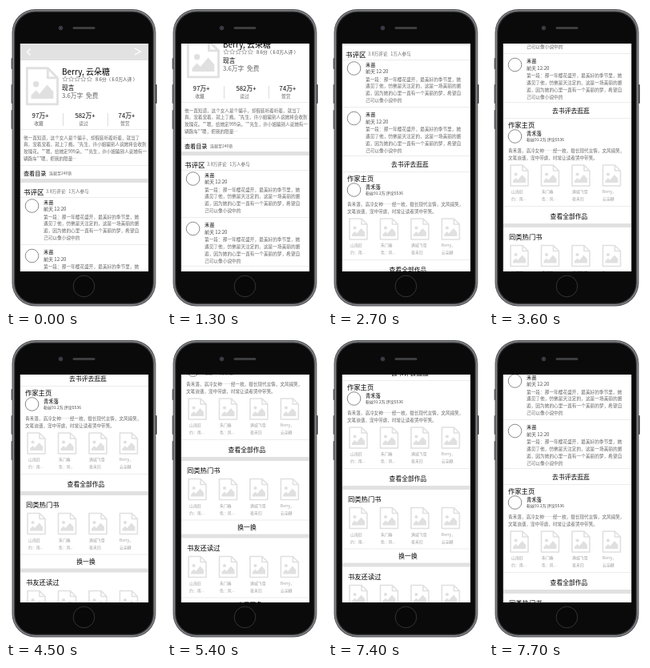
Recreate the animation shown at these times as an HTML page. Size 194 px wide and 379 px high, loop 8 s.

```html
<!DOCTYPE html>
<html lang="zh-CN">
<head>
<meta charset="utf-8">
<style>
  html, body { margin: 0; width: 100%; height: 100%; overflow: hidden; background: #fff; }
  svg { display: block; width: 194px; height: 379px; }
  text { font-family: "Noto Sans CJK SC", "Noto Sans CJK", "Noto Sans", sans-serif; white-space: pre; }
</style>
</head>
<body>
<svg viewBox="0 0 194 379">
  <defs>
    <clipPath id="screen"><rect x="18" y="47" width="160" height="285"/></clipPath>
    <g id="file">
      <path d="M1 1H16L23 8V27H1Z M16 1V8H23" fill="none" stroke="#e0e0e0" stroke-width="1.6" stroke-linejoin="round"/>
      <circle cx="7.5" cy="12.5" r="2.1" fill="#e0e0e0"/>
      <path d="M4 23V20.5L7.500 17L10 19.5L15.5 13L20 18V23Z" fill="#e0e0e0"/>
    </g>
  </defs>

  <g fill="#5a5b5d">
    <rect x="6.500" y="65" width="3" height="14" rx="1"/>
    <rect x="6.500" y="98" width="3" height="24" rx="1"/>
    <rect x="6.500" y="130" width="3" height="24" rx="1"/>
    <rect x="186" y="98" width="3" height="24" rx="1"/>
  </g>
  <rect x="7.5" y="4" width="180" height="371.5" rx="29" fill="#4c4d50"/>
  <rect x="8.5" y="5" width="178" height="369.5" rx="28" fill="#85868a"/>
  <rect x="10" y="6.500" width="175" height="366.5" rx="26.5" fill="#3a3b3d"/>
  <rect x="11.2" y="7.7" width="172.600" height="364.1" rx="25.5" fill="#0a0a0a"/>
  <circle cx="68.500" cy="27.500" r="2.3" fill="#20222c" stroke="#55565a" stroke-width=".8"/>
  <circle cx="68.500" cy="27.500" r=".8" fill="#777b8c"/>
  <rect x="83.500" y="26" width="28" height="3" rx="1.5" fill="#3c3d3f"/>
  <circle cx="97.500" cy="350.500" r="13.3" fill="#080808" stroke="#343537"/>
  <rect x="17" y="47" width="162" height="285" fill="#444"/>

  <g clip-path="url(#screen)">
    <rect x="18" y="47" width="160" height="285" fill="#fff"/>
    <g id="page"></g>
  </g>
</svg>
<script>
const NS = "http://www.w3.org/2000/svg";
const page = document.getElementById("page");
const BLACK = "#000", GREY = "#666", LIGHT = "#a0a0a0";

function add(tag, attrs) {
  const node = document.createElementNS(NS, tag);
  for (const key in attrs) node.setAttribute(key, attrs[key]);
  return page.appendChild(node);
}

// y is the vertical middle of the line of text
function label(str, x, y, size, fill = BLACK, anchor = "start") {
  const node = add("text", { x, y: y + size * 0.37, "font-size": size, fill, "text-anchor": anchor });
  node.textContent = str;
  return node;
}
const lines = (rows, x, y, size, fill, step = 8.8) =>
  rows.forEach((row, i) => label(row, x, y + i * step, size, fill));
const rule = y => add("rect", { x: 18, y, width: 160, height: 1, fill: "#ececec" });
const band = y => add("rect", { x: 18, y, width: 160, height: 5, fill: "#e1e1e1" });
const avatar = y => add("circle", { cx: 32.5, cy: y, r: 8.3, fill: "#fff", stroke: "#888", "stroke-width": 1 });
const icon = (x, y, scale = 1) => add("use", { href: "#file", transform: `translate(${x} ${y}) scale(${scale})` });

function star(cx, cy) {
  const points = Array.from({ length: 10 }, (_, i) => {
    const r = i % 2 ? 1.5 : 3.4, a = i * Math.PI / 5;
    return `${cx + r * Math.sin(a)},${cy - r * Math.cos(a)}`;
  });
  add("polygon", { points: points.join(" "), fill: "none", stroke: "#999", "stroke-width": 0.7 });
}

function cover() {
  add("rect", { x: 18, y: 47, width: 160, height: 21, fill: "#e2e2e2" });
  for (const d of ["M30.5 53.5L26.5 57.5L30.5 61.5", "M161 53L168.5 57L161 61"])
    add("path", { d, fill: "none", stroke: "#fff", "stroke-width": 1.3 });
  icon(24.5, 76, 1.74);
  label("Berry, 云朵糖", 70, 82, 10).setAttribute("font-weight", 500);
  for (let i = 0; i < 5; i++) star(74 + i * 7.6, 91.500);
  label("8.6分（ 6.0万人评 ）", 112, 91.500, 5.7, "#444");
  label("现言", 70, 102, 7.8);
  label("3.6万字  免费", 70, 112, 7.8, GREY);
  [["97万+", "收藏", 43], ["582万+", "读过", 99], ["74万+", "赞赏", 151]].forEach(([count, name, x]) => {
    label(count, x, 137.5, 7.8, BLACK, "middle").setAttribute("font-weight", 500);
    label(name, x - 2, 146.5, 5.7, GREY, "middle");
  });
  for (const x of [71, 127]) add("rect", { x, y: 134, width: 1, height: 16, fill: "#ddd" });
  rule(154);
  lines(["他一直知道，这个女人是个骗子，却假装听着听着，就当了",
    "真，宠着宠着，就上了瘾。\"先生，许小姐骗别人说她将会收到",
    "玫瑰花。\"\"嗯，给她定999朵。\"\"先生，许小姐骗别人说她有一",
    "辆跑车\"\"嗯，把我的限量…"], 22, 164.500, 5.6, GREY);
  rule(199);
  label("查看目录", 22, 209.500, 7.1);
  label("连载至240章", 54, 209.500, 5, GREY);
  band(216);
}

function review(y) {
  avatar(y + 4.5);
  label("禾苗", 47, y, 6.2);
  label("前天 12:20", 47, y + 8.5, 6, "#444");
  lines(["第一段：那一年樱花盛开，最美好的季节里，她",
    "遇见了他，仿佛是天注定的，这是一场美丽的邂",
    "逅，因为她的心里一直有一个美丽的梦，希望自",
    "己可以像小说中的"], 47, y + 18, 5.7, GREY);
}

function more(str, y, x = 100) {
  label(str, x, y, 7.8, BLACK, "middle");
}

function shelf(y) {
  [["山海旧", "约：雨..."], ["朱门春", "色：风..."], ["满城飞雪", "夜未归"], ["Berry，", "云朵糖"]].forEach((rows, i) => {
    icon(26 + i * 38.5, y);
    lines(rows, 28 + i * 38, y + 34.500, 4.9, LIGHT, 9);
  });
  rule(y + 52);
}

cover();
label("书评区", 22, 233, 8.5);
label("3.8万评论   1万人参与", 50, 232, 5.6, GREY);
rule(239);
review(245.5);
rule(298);
review(308);
rule(359);
more("去书评去逛逛", 370.5, 102.5);
rule(379);

label("作家主页", 24, 388, 8.3);
avatar(402);
label("青禾落", 47, 399, 6.3);
label("粉丝91.2万 评论5536", 47, 406.500, 5, "#444");
lines(["青禾落，高冷女神……经一枚，擅长现代言情，文风搞笑，",
  "文笔诙谐，宠中带虐，时常让读者哭中带笑。"], 24, 420, 5.6, GREY);
shelf(437);
more("查看全部作品", 502);
band(511);
label("同类热门书", 25, 528, 8.3);
shelf(537.5);
more("换一换", 599.500);
band(607.500);
label("书友还读过", 25, 624.500, 8.3);
shelf(634.500);
more("查看更多", 696, 103.500);
add("rect", { x: 18, y: 720, width: 160, height: 3, fill: "#f1f1f1" });
add("rect", { x: 67, y: 720, width: 70, height: 3, fill: "#b4b4b4" });

// [time in ms, scroll offset], each held until the next
const steps = [
  [0, 0], [900, 10], [1300, 34], [1800, 60], [1900, 82], [2000, 103], [2100, 117],
  [2600, 140], [2700, 172], [3000, 205], [3600, 239], [3700, 256], [3900, 276], [4000, 296],
  [4500, 318], [4700, 328], [4800, 338], [4900, 348], [5400, 361], [5500, 368], [5700, 377],
  [5900, 385], [6600, 391], [6700, 386], [6900, 368], [7400, 325], [7500, 280], [7600, 234], [7700, 195]
];
const LOOP = 8000;

function draw(time) {
  const t = time % LOOP;
  const [, offset] = steps.findLast(([start]) => t >= start);
  page.setAttribute("transform", `translate(0 ${-offset})`);
}

let origin;
function tick(now) {
  origin ??= now;
  draw(now - origin);
  requestAnimationFrame(tick);
}
draw(0);
requestAnimationFrame(tick);
</script>
</body>
</html>
```
